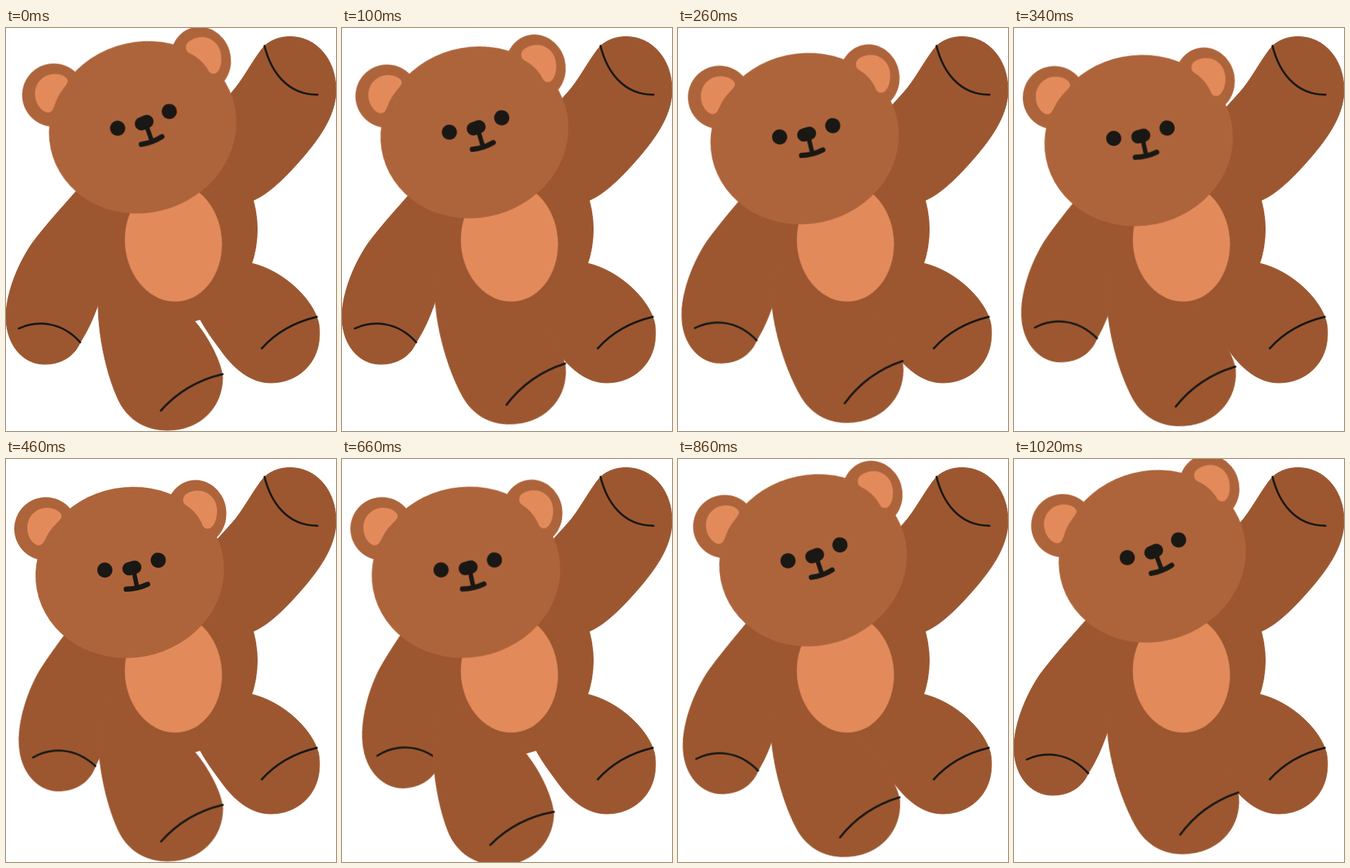
These frames come from a looping animation (480x586 px, 5020 ms). An HTML page:

```html
<!DOCTYPE html>
<html lang="en">
<head>
<meta charset="utf-8">
<title>Waving bear</title>
<style>
  html, body { margin: 0; width: 100%; height: 100%; overflow: hidden; background: #fff; }
  svg { display: block; width: 100%; height: 100%; }
  .limb { fill: #9c5730; stroke: #9c5730; }
  .face { fill: #ae643b; }
  .soft { fill: #e38a5b; }
  .ink { fill: #1a1814; }
  .line { fill: none; stroke: #1a1814; stroke-width: 3; stroke-linecap: round; }
  #head { transform-origin: 34px 13px; }
  #arm { transform-origin: -7px 187px; }
  #leg { transform-origin: 127.7px 377.4px; }
</style>
</head>
<body>
<svg viewBox="0 0 480 586">
  <path class="limb" d="M270 158 L327 95 C345 76 360 44 376 26 C386 17 399 12.500 413 12.500 C452 12.500 480 46 480 90 C480 122 462 152 437 182 C410 214 384 240 361 250 L300 290Z"/>
  <path class="line" d="M376 26 C385 62 408 97 453 97"/>

  <g id="arm">
    <path class="limb" d="M135 200 C103 237 60 283 38 313 C18 342 0 385 0 420 C0 460 24 489 56 489 C82 489 100 476 108 457 C121 437 129 417 137 394 L190 300Z"/>
    <path class="line" d="M18.500 437 C45 425 80 426 108 457"/>
  </g>

  <ellipse class="limb" cx="247" cy="293" rx="118.500" ry="137"/>
  <path class="limb" d="M330 335 L357 342 C400 352 440 388 452 420 C456 430 456 438 456 445 C456 487 425 516 385 516 C355 516 330 494 312 468 C300 452 290 438 282 423 L250 360Z"/>
  <path class="line" d="M372 466 Q402 432 452 420"/>

  <g id="leg">
    <path class="limb" d="M139 350 L134 402 C134 440 143 495 162 538 C176 570 203 585 235 585 C283 585 315 551 315 508 C313 487 296 452 275 427 L250 395Z"/>
    <path class="line" d="M225 556.500 Q261 516 315 503.500"/>
  </g>

  <ellipse class="soft" cx="243.500" cy="311" rx="70.500" ry="87" transform="rotate(-5 243.5 311)"/>

  <g id="head">
    <circle class="face" cx="58" cy="101.500" r="46"/>
    <ellipse class="face" cx="277" cy="78" rx="43.500" ry="47.500" transform="rotate(-10.5 277 78)"/>
    <ellipse class="face" cx="180" cy="165" rx="137.500" ry="124" transform="rotate(-10.5 180 165)"/>
    <path class="soft" d="M31 100 C31 84 43 71 60 71 C70 71 80 76 81 83 C81 88 73 93 66 102 C59 111 57 118 54 122 C49 128 43 126 38 120 C33 114 31 107 31 100Z"/>
    <path class="soft" d="M258 57 C259 50 270 46 279 46 C295 46 307 59 307 75 C307 87 303 98 296 101 C290 102 287 100 285 94 C281 85 274 75 263 68 C258 65 257 61 258 57Z"/>
    <g transform="translate(180 165) rotate(-10.5)">
      <circle class="ink" cx="-35" cy="-10" r="11"/>
      <circle class="ink" cx="44" cy="-10" r="11"/>
      <path class="line" style="stroke-width:19.5" d="M0 -5.500 L8.500 -6"/>
      <path class="line" style="stroke-width:6.5" d="M6 0 L6.500 22"/>
      <path class="line" style="stroke-width:7.5" d="M-9.500 23 Q7 25.500 22.500 21.500"/>
    </g>
  </g>
</svg>
<script>
  const LOOP = 5020;
  const TURN = 635;    // the lowest pose, where everything swings back
  const SETTLE = 970;  // the rest pose, held to the end of the loop
  const sineOut = 'cubic-bezier(.33, .52, .67, 1)';
  const sineInOut = 'cubic-bezier(.37, 0, .63, 1)';
  const softOut = 'cubic-bezier(.33, .43, .67, .83)';

  const pose = (time, angle, easing = 'linear') =>
    ({ offset: time / LOOP, transform: `rotate(${angle}deg)`, easing });

  // Plays the opening poses, then the shared swing from low to rest.
  function swing(id, opening, low, rest) {
    const frames = [
      ...opening,
      pose(TURN, low, sineInOut),
      pose(SETTLE, rest),
      pose(LOOP, rest)
    ];
    document.getElementById(id).animate(frames, { duration: LOOP, iterations: Infinity });
  }

  swing('head', [pose(0, -7.6, sineOut), pose(440, 0)], 0, -8.6);
  swing('arm', [pose(0, 0), pose(180, 0)], -7.7, 0);
  swing('leg', [pose(0, 0), pose(180, -8.3, softOut)], 3.1, -5.5);
</script>
</body>
</html>
```
